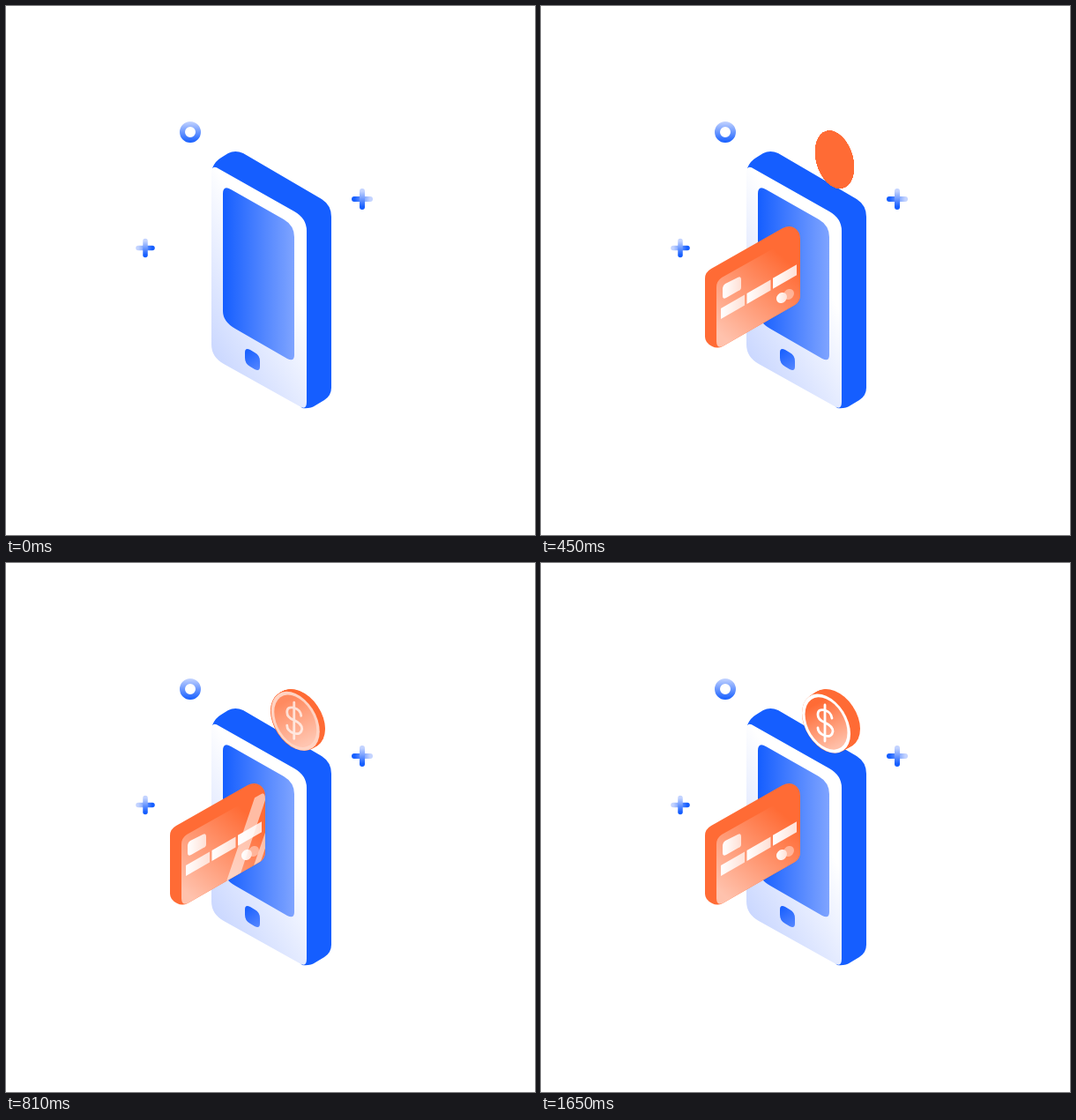
Animation, 600 px wide and 600 px high, one loop 2700 ms. Source, as an HTML page with a canvas:

```html
<!DOCTYPE html>
<html lang="en">
<head>
<meta charset="utf-8">
<title>Mobile payment</title>
<style>
html, body { margin: 0; width: 100%; height: 100%; overflow: hidden; background: #fff; }
canvas { display: block; }
</style>
</head>
<body>
<canvas id="stage" width="600" height="600"></canvas>
<script>
const ctx = document.getElementById('stage').getContext('2d');
const LOOP = 2700, STEP = 30;
const BLUE = '#155eff', ORANGE = '#ff6b35', PALE = '#c3d3ff';

const clamp = v => Math.min(1, Math.max(0, v));
const mix = (a, b, k) => a + (b - a) * k;
const span = (t, from, to) => clamp((t - from) / (to - from));
const inOut = u => u < .5 ? 4 * u ** 3 : 1 - 4 * (1 - u) ** 3;

function gradient(x1, y1, x2, y2, ...colors) {
  const g = ctx.createLinearGradient(x1, y1, x2, y2);
  colors.forEach((c, i) => g.addColorStop(i / (colors.length - 1), c));
  return g;
}

function fill(path, style) {
  ctx.fillStyle = style;
  ctx.fill(path);
}

function stroke(path, style, width) {
  ctx.strokeStyle = style;
  ctx.lineWidth = width;
  ctx.lineCap = ctx.lineJoin = 'round';
  ctx.stroke(path);
}

// Skewed ellipse (or part of one): x axis (a, b), y axis (0, c)
function oval(x, y, a, b, c, from = 0, to = 2 * Math.PI) {
  const unit = new Path2D(), path = new Path2D();
  unit.arc(0, 0, 1, from, to);
  path.addPath(unit, new DOMMatrix([a, b, 0, c, x, y]));
  return path;
}

const shape = d => new Path2D(d);
const phone = {
  side: shape('M234 184Q237 176 244 172L252 167Q260 163 269 167L358 219Q369 226 369 239V433Q369 442 361 447L351 453Q345 457 336 456L300 420Z'),
  front: shape('M233 189Q233 179 242 185L327 233Q341 241 341 255V449Q341 459 333 454L247 406Q233 398 233 384Z'),
  screen: shape('M246 213Q246 203 255 208L315 242Q327 249 327 262V396Q327 404 319 400L260 366Q246 358 246 346Z'),
  button: shape('M271 393Q271 387 277 390L282 393Q288 396 288 403V409Q288 415 282 412L277 409Q271 406 271 399Z'),
  opening: shape('M100 122L315 242Q327 249 327 262V500H100Z')
};
const card = {
  body: shape('M186 309Q186 302 193 298L274 252Q282 248 288 252Q294 256 294 264V328Q294 335 288 339L206 386Q200 389 194 386Q186 382 186 375Z'),
  face: shape('M199 319Q199 312 205 308L285 263Q294 258 294 267V328Q294 335 288 339L206 386Q199 389 199 380Z'),
  chip: shape('M206 320Q206 317 209 315L223 308Q227 306 227 310V319Q227 322 224 323L210 331Q206 333 206 329Z')
};
const dollar = shape('M330 176Q329 169 322 167Q314 165 314 172Q314 178 322 181Q331 185 331 191Q330 198 322 196Q314 193 314 187M322 161V202');

function plus(x, y, r, width, left, right) {
  stroke(shape(`M${x - r} ${y}H${x + r}`), gradient(x - r, y, x + r, y, left, right), width);
  stroke(shape(`M${x} ${y - r}V${y + r}`), gradient(x, y - r, x, y + r, PALE, BLUE), width);
}

function drawScene() {
  stroke(oval(209, 143, 9, 0, 9), gradient(0, 131, 0, 155, PALE, BLUE), 6);
  plus(404, 219, 9, 6, BLUE, PALE);
  plus(158, 274.5, 8, 5.5, PALE, BLUE);
  fill(phone.side, BLUE);
  fill(phone.front, gradient(233, 390, 330, 330, '#cbd8ff', '#fff'));
  fill(phone.screen, gradient(246, 0, 327, 0, BLUE, '#7fa4ff'));
  fill(phone.button, gradient(271, 390, 288, 412, BLUE, '#5586ff'));
}

function drawSheen(t) {
  if (t < 630 || t > 930) return;
  const dx = (t - 690) * 44 / 120, dy = -dx * .54;
  ctx.save();
  ctx.clip(card.face);
  ctx.translate(dx, dy);
  ctx.globalAlpha = .55 * span(t, 600, 690);
  fill(shape('M238 290L254 281L222 376L206 385Z'), '#fff');
  fill(shape('M270 272L277 268L245 362L237 367Z'), '#fff');
  ctx.restore();
}

function drawCard(t) {
  const u = span(t, 60, 390);
  const d = t < 390 ? mix(43, -5, inOut(u)) : mix(-5, 0, span(t, 390, 450));
  const scale = 1 + d * .0068, alpha = u ** 2.2;
  ctx.save();
  ctx.clip(phone.opening);
  ctx.translate(240 + d, 319 - d * .58);
  ctx.scale(scale, scale);
  ctx.translate(-240, -319);
  ctx.globalAlpha = alpha;
  fill(card.body, ORANGE);
  fill(card.face, gradient(202, 372, 275, 285, '#ffc2ad', ORANGE));
  fill(card.chip, gradient(206, 320, 227, 320, '#fff', '#ffe0d5'));
  for (const x of [204, 233.5, 263]) {
    const y = 343 - (x - 204) * .58;
    fill(shape(`M${x} ${y}l27 -15.5v12l-27 15.5z`), gradient(x, 0, x + 27, 0, '#fff', '#ffe0d5'));
  }
  ctx.globalAlpha = alpha * .4;
  fill(oval(281, 327, 6, -1, 6), '#fff');
  ctx.globalAlpha = alpha;
  fill(oval(273, 331, 6, -1, 6), gradient(267, 0, 279, 0, '#fff', '#ffe0d5'));
  drawSheen(t);
  ctx.restore();
}

function drawArcs(t) {
  const u = (t - 1140) / 510;
  if (u <= 0 || u >= 1) return;
  const tail = Math.PI * inOut(u), head = Math.PI * inOut(clamp(u / .6));
  const tint = gradient(300, 150, 350, 215, ORANGE, '#ffe3d9');
  for (const start of [0, Math.PI]) {
    if (start) stroke(oval(322.5, 182, 31, 13, 34, start + tail, start + head), '#fff', 4);
    stroke(oval(322.5, 182, 34, 14, 37, start + tail, start + head), tint, 3);
  }
}

function drawCoin(t) {
  const p = span(t, 270, 600), rest = 1 - p;
  if (!p) return;
  const width = 29 * (1 - rest ** 1.8), y = 176.5 - 24 * rest ** 3;
  const out = inOut(span(t, 600, 1020));
  const at = k => [mix(333, 323.5, k), mix(y, 182, k)];
  ctx.save();
  ctx.globalAlpha = clamp(p * 3);
  for (let i = 0; i <= 10; i++) {
    const k = out * i / 10;
    fill(oval(...at(k), mix(width, 27.5, k), width * .4, 31.5), ORANGE);
  }
  ctx.globalAlpha = span(t, 600, 900);
  if (ctx.globalAlpha) {
    const [x, cy] = at(out);
    fill(oval(x, cy, 27.5, 12, 31.3), '#fff');
    ctx.translate(x - 323.5, cy - 182);
    fill(oval(323.5, 182, 24, 10.5, 27.8), gradient(312, 160, 336, 208, ORANGE, '#ffbfa8'));
    stroke(dollar, '#fff', 2.8);
  }
  ctx.restore();
  drawArcs(t);
}

let begin;
function frame(now) {
  begin ??= now;
  const t = Math.floor((now - begin) % LOOP / STEP) * STEP;
  ctx.clearRect(0, 0, 600, 600);
  drawScene();
  if (t >= 90) {
    drawCard(t);
    drawCoin(t);
  }
  requestAnimationFrame(frame);
}
requestAnimationFrame(frame);
</script>
</body>
</html>
```
